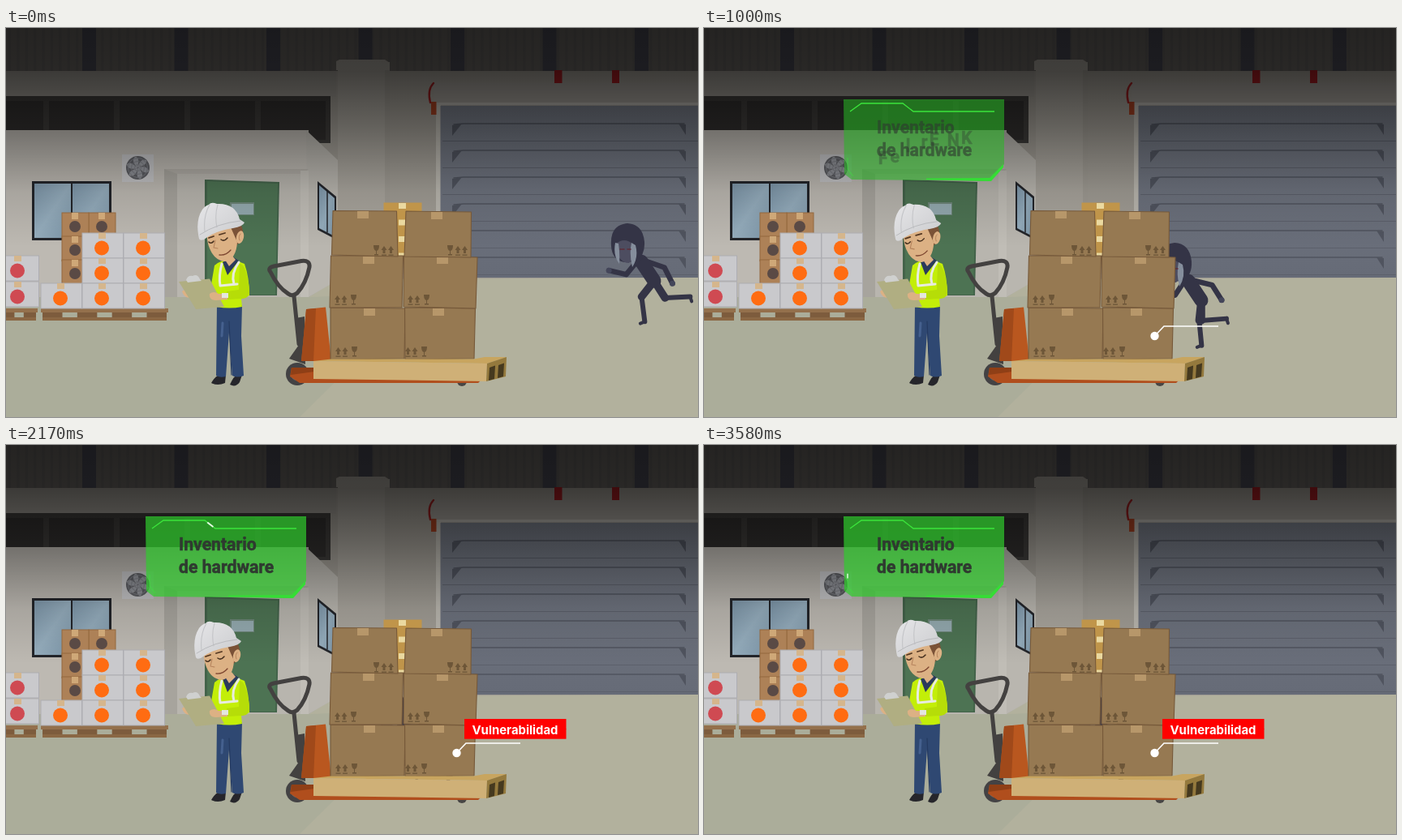
Animation, 853 px wide and 480 px high, one loop 3.66 s. Source, as an HTML page:

```html
<!DOCTYPE html>
<html lang="es">
<head>
<meta charset="utf-8">
<title>Inventario de hardware</title>
<style>
html, body { margin: 0; width: 100%; height: 100%; overflow: hidden; background: #b0af9b; }
svg { display: block; width: 100vw; height: 100vh; }
.head { font: 700 21.2px Roboto, "Liberation Sans", sans-serif; fill: #2f3a30; stroke: #2f3a30; stroke-width: .5; }
.tag { font: 700 14.9px Inter, "Open Sans", sans-serif; fill: #fff; }
</style>
</head>
<body>
<svg viewBox="0 0 853 480" preserveAspectRatio="none">
<defs>
  <linearGradient id="shade" gradientUnits="userSpaceOnUse" x1="0" y1="0" x2="0" y2="270">
    <stop offset="0" stop-opacity=".66"/><stop offset=".2" stop-opacity=".62"/>
    <stop offset=".46" stop-opacity=".4"/><stop offset=".75" stop-opacity=".11"/><stop offset="1" stop-opacity="0"/>
  </linearGradient>
  <linearGradient id="glass" x1="0" y1="0" x2="1" y2="1">
    <stop offset="0" stop-color="#7d96a9"/><stop offset=".5" stop-color="#95adbd"/><stop offset="1" stop-color="#7b94a6"/>
  </linearGradient>
  <linearGradient id="gate" x1="0" y1="0" x2="0" y2="1">
    <stop offset="0" stop-color="#757a85"/><stop offset="1" stop-color="#666b77"/>
  </linearGradient>
  <linearGradient id="hat" x1="0" y1="0" x2="1" y2="1">
    <stop offset="0" stop-color="#e6e6e8"/><stop offset="1" stop-color="#c9cacd"/>
  </linearGradient>
  <filter id="soft" x="-10%" y="-50%" width="120%" height="200%"><feGaussianBlur stdDeviation="1"/></filter>
</defs>
<g id="room"></g>
<g id="thief"></g>
<g id="goods"></g>
<g id="worker"></g>
<g id="panel">
  <g id="bars" filter="url(#soft)"></g>
  <path id="plate" d="M172 88H370V168L352 189L182 187L173 180Z"/>
  <g id="trim" fill="none" stroke="#3be53b">
    <path d="M180 103L194 93H245L258 103H358" stroke-width="1.3"/>
    <path d="M177 160V174L184 183" stroke-width="1" opacity=".6"/>
    <path d="M274 185.5L352 185L369 168V172L354 189L274 187Z" fill="#35dd35" stroke="none"/>
  </g>
  <path id="glint" d="M180 103L194 93H245L258 103H358" fill="none" stroke="#e4f8e2" stroke-width="2" stroke-dasharray="9 400"/>
  <path id="spark" d="M177 157V172L183 180" fill="none" stroke="#e4f8e2" stroke-width="1.5"/>
  <g id="scramble" class="head"></g>
  <g id="title" class="head"><text x="213" y="130">Inventario</text><text x="213" y="158">de hardware</text></g>
</g>
<g id="label">
  <g id="redBars" fill="#f00"></g>
  <text id="tagText" class="tag" x="574.5" y="357">Vulnerabilidad</text>
  <path id="lead" d="M555.5 380L567 368H634" fill="none" stroke="#fff" stroke-width="1.6" pathLength="100" stroke-dasharray="100 200"/>
  <circle id="dot" cx="555.5" cy="380" r="5.2" fill="#fff"/>
</g>
</svg>
<script>
const $ = id => document.getElementById(id);
const set = (id, attrs) => Object.entries(attrs).forEach(([name, v]) => $(id).setAttribute(name, v));
const show = (id, on) => { $(id).style.display = on ? '' : 'none'; };
const poly = (pts, fill, extra = '') => `<polygon points="${pts}" fill="${fill}" ${extra}/>`;
const rect = (x, y, w, h, fill, extra = '') => `<rect x="${x}" y="${y}" width="${w}" height="${h}" fill="${fill}" ${extra}/>`;
const disc = (x, y, r, fill, extra = '') => `<circle cx="${x}" cy="${y}" r="${r}" fill="${fill}" ${extra}/>`;
const path = (d, fill, extra = '') => `<path d="${d}" fill="${fill}" ${extra}/>`;
const line = (d, color, w) =>
  `<path d="${d}" fill="none" stroke="${color}" stroke-width="${w}" stroke-linecap="round" stroke-linejoin="round"/>`;
const repeat = (n, fn) => Array.from({ length: n }, (_, i) => fn(i)).join('');
const clamp = v => Math.max(0, Math.min(1, v));
const ramp = (t, a, b) => clamp((t - a) / (b - a));
const ease = (t, a, b) => { const p = ramp(t, a, b); return p * p * (3 - 2 * p); };
const lerp = (a, b, p) => a + (b - a) * p;
const rand = n => { const s = Math.sin(n * 127.1 + 11.7) * 43758.5453; return s - Math.floor(s); };

function drawRoom() {
  let s = rect(0, 0, 853, 480, '#a09c94');
  // floor
  s += poly('0,332 373,332 409,310 853,308 853,480 0,480', '#b2b19d');
  s += poly('0,332 373,332 430,330 430,413 362,480 0,480', '#abad9a');
  // ceiling
  s += rect(0, 0, 853, 53, '#6c6864');
  s += repeat(82, i => rect(3 + i * 10.4, 0, 3, 53, '#5f5c5d', 'opacity=".5"'));
  s += repeat(7, i => rect(94 + i * 113.5, 0, 17, 53, '#4a4a55'));
  // long dark window above the office
  s += rect(0, 53, 407, 32, '#9d9992') + rect(0, 84, 400, 58, '#3e3c3a');
  s += repeat(5, i => rect(-34 + i * 87, 90, 80, 48, '#312f2e'));
  // pillar
  s += rect(409, 42, 64, 290, '#a8a49c') + poly('407,41 411,39 467,39 473,43 473,52 407,52', '#a9a59d');
  s += rect(467, 52, 6, 260, '#9f9b93');
  // office
  s += rect(0, 126, 373, 206, '#bdb9b2') + poly('370,126 409,163 409,311 373,332', '#b9b6af');
  s += rect(195, 174, 178, 158, '#b8b5ae') + rect(195, 174, 16, 158, '#a7a49d');
  s += poly('195,174 373,174 366,180 211,180', '#b0aca5') + rect(363, 176, 10, 156, '#c0bdb6');
  s += poly('245,187 337,190 334,330 245,330', '#43634a') + poly('248,189 335,192 332,329 248,329', '#4d7353');
  s += rect(276, 215, 30, 16, '#6c8477') + rect(278, 217, 27, 13, '#93a9ae');
  // office windows
  s += rect(32, 189, 98, 73, '#23252a') + repeat(2, i => rect(35 + i * 47, 192, 45, 67, 'url(#glass)'));
  s += poly('384,189 407,208 407,261 384,249', '#23252a') + poly('386,194 405,210 405,257 386,247', 'url(#glass)');
  s += line('M396 201V252', '#23252a', 1.5);
  // fan
  s += rect(143, 156, 39, 34, '#c3c3c5') + disc(162.5, 172.5, 14.5, '#5c5d62');
  s += repeat(6, i => path('M162 172Q166 160 173 163Q175 169 162 172', '#8d8f95', `transform="rotate(${i * 60} 162.5 172.5)"`));
  s += repeat(3, i => disc(162.5, 172.5, 4 + i * 4, 'none', 'stroke="#77797f" stroke-width="1"'));
  // rolling gate
  s += rect(527, 68, 326, 28, '#a19d97') + rect(530, 92, 323, 3, '#b5b2ac');
  s += rect(530, 95, 6, 213, '#b9b6ae') + rect(535.5, 96, 318, 212, 'url(#gate)');
  s += repeat(6, i => {
    const y = 118 + i * 33;
    return rect(538, y + 21, 315, 1, '#5c606b') + line(`M552 ${y + 1}L564 ${y}H836`, '#50545f', 1.5)
      + poly(`550,${y + 15} 550,${y + 2} 562,${y}`, '#50545f') + poly(`838,${y + 14} 838,${y + 1} 829,${y}`, '#50545f');
  });
  // wall fittings
  s += rect(676, 52, 9.5, 16, '#a31d22') + rect(747, 52, 9, 16, '#a31d22');
  s += line('M527 68Q519 76 523 92', '#9a1f20', 2.4) + rect(524, 91, 6.5, 16, '#a34022');
  s += rect(0, 0, 853, 270, 'url(#shade)');
  $('room').innerHTML = s;
}

const ink = '#6d5638';
const arrow = (x, y) => path(`M${x} ${y + 5}l3.5 -5l3.5 5h-2v4h-3v-4Z`, ink) + rect(x + .5, y + 10.5, 6, 1.3, ink);
const cup = (x, y) => path(`M${x} ${y - 1}h7q0 6 -3 7v4h2v1.5h-5v-1.5h2v-4q-3 -1 -3 -7Z`, ink);
const marks = (x, y, cupFirst) => cupFirst
  ? cup(x, y) + arrow(x + 9.5, y) + arrow(x + 18, y)
  : arrow(x, y) + arrow(x + 8.5, y) + cup(x + 20, y);

const pallet = (x, w) => rect(x, 346, w, 5, '#94704c')
  + repeat(4, i => rect(x + 2 + i * (w - 4) * .28, 351, (w - 4) * .16, 6, '#7d5c3d'))
  + rect(x + 2, 357, w - 4, 4, '#8a6744');
const bundle = (x, y) => rect(x, y, 33, 30.5, '#ad8157', 'stroke="#93693f"') + rect(x + 12, y, 8, 8, '#cfa878')
  + disc(x + 16, y + 17, 7, '#5a4a45');
const crate = (x, y, color) => rect(x, y, 50.5, 31, '#c9c9cc', 'stroke="#adadb2"')
  + rect(x + 20, y, 9, 7, '#d5b68c') + disc(x + 24, y + 18.5, 9, color);
const carton = (pts, tx, ty) =>
  poly(pts, '#967952', 'stroke="#76593a" stroke-width="1.1" stroke-linejoin="round"') + rect(tx, ty, 14, 9, '#b7976a');

function drawGoods() {
  // stock on the left
  let s = pallet(-60, 99) + pallet(43, 157);
  s += bundle(102, 228) + repeat(3, i => bundle(69, 228 + i * 29));
  s += repeat(2, i => crate(-10, 281 + i * 32, '#cf4a52'));
  s += crate(43, 315, '#ff6c12');
  s += repeat(6, i => crate(94 + i % 2 * 51, 253 + (i >> 1) * 31, '#ff6c12'));

  // yellow boxes behind the stack
  s += rect(465.5, 215.5, 47, 67, '#c0954a') + repeat(4, i => rect(484, 216 + i * 20.5, 9, 7, '#ead9a0'));

  // hand truck
  s += line('M326 301Q322 296 330 294L364 287.500Q375 286 374 295Q370 315 359 327Q353 332 348 328Q335 320 326 301Z', '#434140', 5);
  s += line('M355 331L361 390', '#434140', 5) + poly('357,358 368,356 369,415 349,408 361,391', '#434140');
  s += disc(359, 427, 14, '#434244') + disc(359, 427, 8, '#6f6f70') + disc(562, 436, 6, '#474645');
  s += poly('352,419 380,419 380,432 585,435 582,438 362,438 350,430', '#b04e1d') + poly('352,419 380,419 380,424 351,428', '#8f3f16');
  s += poly('370,347 394,344.5 401,411 364,411', '#b9571f') + poly('370,347 382,346 379,411 364,411', '#a0491a');

  // stack
  s += carton('400,345 492,346 491,408 400,409', 441, 346);
  s += carton('491.500,345 578.500,346 577,408 492,409', 526, 346);
  s += carton('400.500,281 489.500,281 488,345 399,345', 440, 282);
  s += carton('490.500,281 581,283 579,346 490,344', 531, 282);
  s += carton('403,225.500 481.500,226 483,282 401.500,280', 433, 226);
  s += carton('493,226 573.500,227 573,283 491,282', 524, 227);
  s += repeat(2, i => marks(453 + i * 91, 269, true) + marks(405 + i * 90, 330) + marks(406 + i * 86, 394));

  // carrying pallet
  s += poly('379,411 401,408.500 577,408.500 590,406 617,406 593,414', '#c8a55f');
  s += poly('379,411 593,414 592,436 379,433', '#cfb077') + poly('593,414 617,406 616,430 592,436', '#94793d');
  s += repeat(2, i => path(`M${596 + i * 11} ${419 - i * 3}l7 -2.500l-1 16.500l-7 2Z`, '#45391f'));
  $('goods').innerHTML = s;
}

function drawWorker() {
  const skin = '#dcb184', navy = '#2f4872', lime = '#c3ee08', silver = '#e8ebe0';
  let s = path('M253 438Q258 429 264 428H271L270 438Q261 442 253 438Z', '#26262b') + path('M276 440Q281 429 285 428H291L288 437Q283 444 276 440Z', '#26262b');
  s += path('M260 342H291L290 380L293 429Q285 432 279 429L275 376L271 430Q264 432 259 429Z', navy);
  s += line('M275 362L278 428', '#253a60', 1.2) + line('M267 364L266 380', '#45608e', 3);
  // torso and arms
  s += path('M257 293Q265 285 281 286L294 291Q300 308 300 330L290 334L291 344Q275 347 260 344L258 325L252 322Z', lime);
  s += path('M288 291Q296 291 300 322Q301 333 292 334L272 335V325L287 323Z', '#b6dd08');
  s += path('M267 289L273 305L287 287L279 282Z', '#2b3a5c') + path('M270 286L275 294L283 286L278 280Z', skin);
  s += line('M266 291Q262 306 264 318L285 316', silver, 3) + line('M287 289Q277 303 281 316', silver, 3);
  // clipboard
  s += path('M217 325Q222 320 229 326L226 333Q219 332 217 325Z', skin);
  s += poly('213,313 251,309.500 269,344 234,347', '#b0ae82');
  s += path('M222 311Q224 305 230 306Q236 303 239 310L241 312L224 314Z', '#cfd0cf');
  s += path('M251 328Q256 324 262 328H273V335L259 336Q250 336 251 328Z', skin) + rect(266, 327, 8, 6, '#e4e6df');
  // head
  s += '<g id="wHead">' + path('M270 244L289 242Q294 250 291 262L282 270L274 262Z', '#7a5237');
  s += path('M248 252Q247 263 251 272Q257 287 270 288Q284 285 285 264L277 246Z', skin);
  s += `<ellipse cx="288.500" cy="258" rx="4.500" ry="8" fill="${skin}" transform="rotate(12 288 258)"/>`;
  s += line('M289 254Q286 257 288 262', '#b5835c', 1);
  s += line('M250 264Q253 267 256 263M265 261Q269 264 273 259', '#46301f', 1.5) + line('M250 259L256 257M263 255L270 253', '#533722', 1.8);
  s += line('M258 262L256 271L261 272', '#b5835c', 1.1) + line('M263 280Q271 281 277 274', '#7d4630', 1.3);
  s += path('M238 260Q233 238 242 224Q246 219 250 218Q253 214 260 217Q283 216 288 236L294 240Q292 245 280 247Q258 250 244 261Q239 263 238 260Z', 'url(#hat)');
  s += line('M251 218Q243 232 245 251M261 218Q257 231 260 246', '#c3c4c7', 1.1) + line('M239 255Q260 241 289 238', '#b9babd', 1) + '</g>';
  $('worker').innerHTML = s;
}

// angles in degrees from straight down, positive to the right
const joint = ([x, y], angle, len) => {
  const a = angle * Math.PI / 180;
  return [x + len * Math.sin(a), y + len * Math.cos(a)];
};
const stride = 1660, cloth = '#343446';
const swing = (t, peak) => Math.cos((t - peak) / stride * 2 * Math.PI);

function leg(hip, t) {
  const knee = joint(hip, 55 * swing(t, 600) - 3, 25);
  const shin = 50 + 46 * swing(t, 930);
  const foot = joint(knee, shin, 31), toe = joint(foot, shin - 75, 6);
  return line(`M${hip}L${knee}`, cloth, 9.5) + line(`M${knee}L${foot}`, cloth, 6) + line(`M${foot}L${toe}`, cloth, 4);
}

function arm(neck, upper, fore) {
  const elbow = joint(neck, upper, 26), hand = joint(elbow, fore, 22);
  return line(`M${neck}L${elbow}L${hand}`, cloth, 6.5) + disc(...hand, 3.5, '#44465a');
}

function drawThief(t) {
  const run = Math.min(t, 1580) / 1000;
  const hip = [799 - 186 * run, 312 + 24 * run * run];
  const neck = [hip[0] - 18, hip[1] - 28];
  const sway = 8 * swing(t, 600);
  $('thief').innerHTML = arm([neck[0] + 6, neck[1] + 3], 76 + sway, 32 + sway)
    + leg(hip, t) + leg(hip, t + stride / 2)
    + line(`M${neck[0] + 2} ${neck[1] + 4}L${hip}`, cloth, 17) + arm(neck, -34 + sway, -98 + sway)
    + `<g transform="translate(${neck[0] - 15} ${neck[1] - 23})">`
    + path('M-20 8Q-22 -18 0 -20Q19 -19 21 3Q22 19 11 27L-4 28Q-19 25 -20 8Z', cloth)
    + path('M-15 6Q-4 -4 7 6Q10 22 2 29Q-12 29 -15 6Z', '#4d4d60')
    + path('M-15 4Q-18 20 -10 30Q-9 18 -11 5ZM5 4Q2 18 6 34Q14 22 10 7Z', '#858e9c')
    + line('M-9 12H-4M0 12H4', '#5e2c39', 1.6) + '</g>';
}

const letters = 'FelrENK';

function drawPanel(t, k) {
  // sliding stripes, then the plate
  const grow = ramp(t, 420, 660);
  set('bars', { opacity: .3 * ramp(t, 160, 420) * (1 - ramp(t, 580, 750)) });
  $('bars').innerHTML = repeat(6, i => {
    const w = lerp(158, 194, grow) * ramp(t, 80, 420);
    return rect(i % 2 ? 173 : 369 - w, 91 + i * 15.5, w, lerp(11, 16, grow), '#2fc92c');
  }) + rect(205, 186, 150 * ramp(t, 170, 420), 3, '#35e035');
  const glow = ease(t, 750, 1170);
  set('plate', {
    fill: `rgb(${lerp(26, 48, glow)} ${lerp(135, 205, glow)} ${lerp(24, 45, glow)})`,
    'fill-opacity': lerp(.36 * ramp(t, 500, 700), .7, glow)
  });
  set('trim', { opacity: ramp(t, 500, 740) });

  // loose letters jump about until the title settles
  const settle = ease(t, 830, 1120);
  $('scramble').innerHTML = t > 580 && settle < 1 ? [...letters].map((c, i) => {
    const n = k * 17 + i;
    return `<text x="${213 + i * 16 + 8 * rand(n)}" y="${163 - i * 4 + 14 * (rand(n + 5) - .5)}" opacity="${1 - settle}">${c}</text>`;
  }).join('') : '';
  set('title', { opacity: settle });

  // lights running along the trim
  set('glint', { 'stroke-dashoffset': 4 - lerp(181, -12, 1 - (1 - ramp(t, 1250, 3400)) ** 1.4) });
  show('glint', t > 1160 && t < 3400);
  const f = ((t - 1065) / 617 + 2) % 1;
  set('spark', { 'stroke-dasharray': `${3 + 9 * Math.sin(Math.PI * clamp(f / .75))} 99`, 'stroke-dashoffset': -f * 22 });
  show('spark', t > 1060 && f < .7);
}

function drawLabel(t) {
  const run = 1 - (1 - ramp(t, 160, 510)) ** 2;
  set('dot', { r: 5.2 * ease(t, 80, 330) });
  set('lead', { 'stroke-dashoffset': 100 * (1 - run) });
  show('lead', run > 0);
  // two thin bars spread until they join into one tag
  const open = ease(t, 1250, 1580), w = lerp(88, 125.5, open), h = lerp(6, 12.7, open);
  set('redBars', { opacity: ramp(t, 1080, 1230), filter: open < 1 ? 'url(#soft)' : 'none' });
  $('redBars').innerHTML = rect(690.5 - w, lerp(344, 338, open), w, h, '#f00') + rect(565, lerp(353.5, 350, open), w, h, '#f00');
  set('tagText', { opacity: ramp(t, 1400, 1660) });
}

const loop = 3660, fps = 12;
let last = -1;
function update(now) {
  const k = Math.min(43, Math.floor((now % loop + 3.4) * fps / 1000));
  if (k === last) return;
  last = k;
  const t = Math.round(k * 100 / fps) * 10;
  drawThief(t);
  drawPanel(t, k);
  drawLabel(t);
  const nod = ease(t, 830, 1200) - ease(t, 3000, 3420);
  set('wHead', { transform: `translate(${-4 * nod} ${2 * nod})` });
}

drawRoom();
drawGoods();
drawWorker();
const began = performance.now();
function tick() {
  update(performance.now() - began);
  requestAnimationFrame(tick);
}
tick();
</script>
</body>
</html>
```
